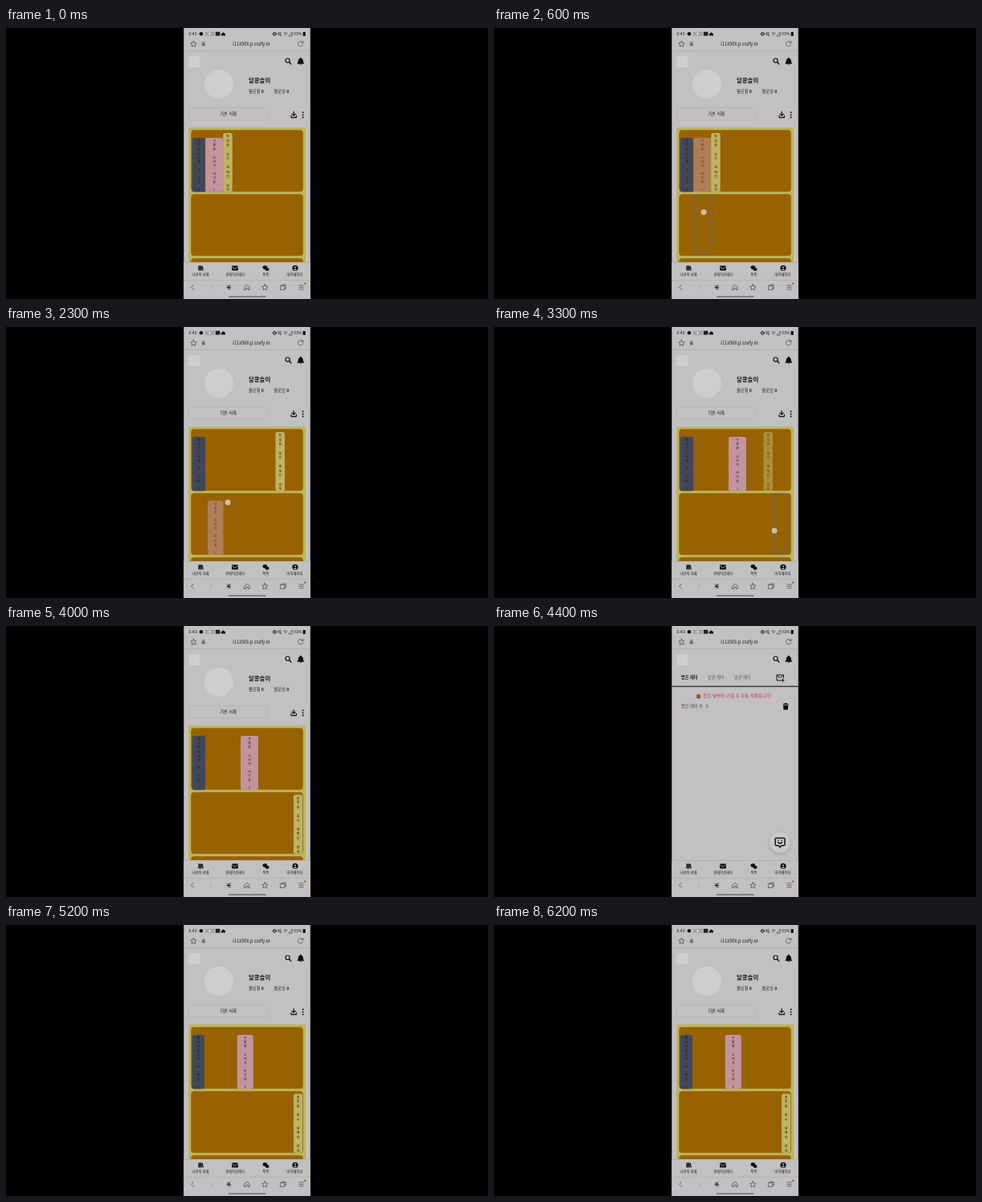
An HTML page that plays this animation: 600x338 px, repeating every 6.3 s.

```html
<!DOCTYPE html>
<html lang="ko">
<head>
<meta charset="utf-8">
<style>
  html, body { margin: 0; width: 100%; height: 100%; overflow: hidden; background: #000; }
  svg { display: block; width: 600px; height: 338px; }
  text { font: 5.2px "Noto Sans CJK KR", "Noto Sans CJK", "Noto Sans", sans-serif; fill: #1c1a1c; }
  .mid { text-anchor: middle; }
  .bold { font-weight: bold; }
  .tab { fill: #555; }
  .nav { font-size: 4.3px; }
  .line { fill: none; stroke: #161416; stroke-width: 1; stroke-linecap: round; stroke-linejoin: round; }
  .thin { stroke: #444; stroke-width: .7; }
  .ink { fill: #0c0b0c; }
  .paper { fill: #c2c0c2; }
  .mark { fill: #d0cdd0; }
  .rule { fill: #a9a7a9; }
  .spine { font-size: 3.9px; text-anchor: middle; }
  .shelf { fill: #986200; }
</style>
</head>
<body>
<svg viewBox="0 0 600 338">
  <defs>
    <clipPath id="view"><rect x="221" y="30" width="158" height="262"/></clipPath>
    <filter id="blur" x="-50%" y="-50%" width="200%" height="200%"><feGaussianBlur stdDeviation="2"/></filter>
  </defs>
  <rect width="600" height="338"/>
  <rect class="paper" x="221.3" width="157.5" height="338"/>

  <g id="library" clip-path="url(#view)">
    <circle class="mark" cx="265" cy="70" r="18"/>
    <text x="302" y="68" style="font-size:7.4px" class="bold">달콩솔이</text>
    <text x="302" y="81">팔로워 <tspan class="bold">0</tspan></text>
    <text x="333.5" y="81">팔로잉 <tspan class="bold">0</tspan></text>
    <rect x="227" y="99.5" width="98.5" height="15.5" rx="2" fill="none" stroke="#b0aeb0" stroke-width=".7"/>
    <text x="276.5" y="109.3" class="mid">기본 서재</text>
    <path class="line" style="stroke-width:1.2" d="M358.2 104.3v5m-2.2-2.2 2.2 2.2 2.2-2.2M355 109.3v2.3h6.4v-2.3"/>
    <g class="ink"><circle cx="369.6" cy="105.3" r=".95"/><circle cx="369.6" cy="108.4" r=".95"/><circle cx="369.6" cy="111.5" r=".95"/></g>
    <rect x="227" y="124" width="146" height="190" rx="3" fill="#beb55c"/>
    <rect class="shelf" x="230.3" y="127.3" width="139.5" height="77" rx="4"/>
    <rect class="shelf" x="230.3" y="207.3" width="139.5" height="77" rx="4"/>
    <rect class="shelf" x="230.3" y="287.3" width="139.5" height="77" rx="4"/>
    <g id="books"></g>
    <rect id="slot" height="73" fill="none" stroke="#626468" stroke-width="1.4" stroke-dasharray="4 2" rx="2"/>
  </g>

  <g id="letters">
    <text x="233" y="66" class="bold">받은 레터</text>
    <text x="266" y="66" class="tab">보낸 레터</text>
    <text x="299" y="66" class="tab">보관 레터</text>
    <path class="line" d="M357 68h-5v-7h8.5v3.5M352 61.5l4.2 3 4.2-3M359.5 66v3.5M357.8 67.8h3.4"/>
    <rect x="221.3" y="74.7" width="157.5" height="1.4" fill="#343234"/>
    <circle cx="254.6" cy="87.3" r="2.5" fill="#a64c32"/>
    <path d="M252 89.6h5.2" stroke="#57462c"/>
    <text x="260.5" y="88.5" style="fill:#c02e52;font-size:5.4px">받은 날부터 15일 후 자동 삭제됩니다!</text>
    <text x="233" y="102.3" style="fill:#4c4024">받은 레터 수 : 0</text>
    <path class="ink" d="M359.6 97h2l.6-1h1.8l.6 1h2v1.1h-7zM360 98.8h6.2l-.4 5.6h-5.4z"/>
    <circle cx="356" cy="271.5" r="13" fill="#888" opacity=".6" filter="url(#blur)"/>
    <circle cx="356" cy="270" r="13" fill="#cac8ca"/>
    <path class="line" style="stroke-width:1.5" d="M351.3 264.5h9.5q1.2 0 1.2 1.2v6.8q0 1.2-1.2 1.2h-2.6l-2.2 2.2-2.2-2.2h-2.5q-1.2 0-1.2-1.2v-6.8q0-1.2 1.2-1.2zM353.5 269.8q2.5 2.8 5 0M353.8 267.4h.1M358.2 267.4h.1"/>
  </g>

  <g id="loader"></g>

  <!-- status and address bars -->
  <g>
    <text x="227.5" y="9.2">6:43</text>
    <circle cx="243" cy="7.3" r="2.3" class="ink"/>
    <path class="line thin" d="M248 5l1.4 1.6m0 1.4-1.4 1.6M252 5l-1.4 1.6m0 1.4 1.4 1.6M255 5l1.4 1.6m0 1.4-1.4 1.6M259 5l-1.4 1.6m0 1.4 1.4 1.6"/>
    <rect x="260.8" y="4.8" width="5.6" height="5" rx=".8" fill="#222"/>
    <path class="ink" d="M268 9.5q-1.3-2.2 1-2.6.8-2.4 2.6-.6 2 .6 1.3 3.2z"/>
    <circle class="line" cx="334.3" cy="7.4" r="1.9"/>
    <path class="line thin" d="M334.3 6.2v1.4h1M338.8 6.5h1.2l1.8-1.6v5l-1.8-1.6h-1.2zM338.6 5l4 4.6M345.5 6.4q2.3-2 4.6 0M346.5 7.8q1.3-1 2.6 0M347.8 9.2h.1M352 9.8l4.4-4.8v4.8z"/>
    <text x="358.3" y="9.2" style="font-size:5px">93%</text>
    <rect x="369.7" y="5" width="3" height="5" rx=".6" class="ink"/>
    <path class="line thin" d="M233.5 16.2l1.1 2.4 2.6.3-1.9 1.8.5 2.6-2.3-1.3-2.3 1.3.5-2.6-1.9-1.8 2.6-.3z"/>
    <rect x="244" y="19.3" width="3.6" height="3" fill="#666"/>
    <path class="line thin" d="M244.8 19v-1q1-1.4 2 0v1M369.4 18a3.2 3.2 0 1 0 .4 2.5M369.8 16.4v2h-2"/>
    <text x="305.5" y="22" class="mid" style="font-size:5.6px">i11a506.p.ssafy.io</text>
    <rect class="rule" x="221.3" y="28" width="157.5" height=".6"/>
    <rect class="mark" x="227.5" y="35" width="14" height="14"/>
    <circle class="line" cx="350.6" cy="40.6" r="2.6" style="stroke-width:1.2"/>
    <path class="line" style="stroke-width:1.4" d="M352.6 42.6l2.2 2.3"/>
    <path class="ink" d="M366.8 36.8q.9 0 .9 1 2.2.7 2.2 3.5 0 2 1.3 3.4h-8.8q1.3-1.4 1.3-3.4 0-2.8 2.2-3.5 0-1 .9-1zM365.7 45.2h2.2q-1.1 1.7-2.2 0z"/>
  </g>

  <!-- app navigation and browser bar -->
  <g>
    <rect class="paper" x="221.3" y="292" width="157.5" height="46"/>
    <rect class="rule" x="221.3" y="292" width="157.5" height=".6"/>
    <rect class="rule" x="221.3" y="314.3" width="157.5" height=".5"/>
    <path class="ink" d="M239.5 296.4h2v6.2h-2zM241.9 296.4h1.6v6.2h-1.6zM243.6 297l1.2-.3 1 5.6-1.3.3z"/>
    <rect x="281" y="296.4" width="8" height="6.2" rx="1" class="ink"/>
    <path d="M281 297.7l4 2.8 4-2.8" fill="none" stroke="#c2c0c2" stroke-width=".8"/>
    <ellipse cx="322.4" cy="298.6" rx="2.8" ry="2.3" class="ink"/>
    <ellipse cx="325.1" cy="301" rx="2.5" ry="1.9" class="ink"/>
    <circle cx="360" cy="299.5" r="3.6" class="ink"/>
    <g class="paper"><circle cx="360" cy="298.5" r="1.1"/><path d="M357.9 301.6q2.1-2.4 4.2 0-2.1 1.6-4.2 0z"/></g>
    <g class="mid">
      <text class="nav" x="242" y="309.2">나만의 서재</text>
      <text class="nav" x="285" y="309.2">큐레이션레터</text>
      <text class="nav" x="323.5" y="309.2">톡톡</text>
      <text class="nav" x="359.5" y="309.2">마이페이지</text>
    </g>
    <path class="line thin" d="M233.5 320.3l-2.8 3 2.8 3"/>
    <path class="line thin" style="stroke:#999" d="M254 320.3l2.8 3-2.8 3"/>
    <path class="line thin" style="stroke:#161416" d="M275 321l4.5 5M279.5 320.5l-4.3 4.8M275 323.5h5M277.5 321v5"/>
    <path class="line thin" d="M296.8 323l3.2-2.7 3.2 2.7v3.6h-2v-2.2h-2.4v2.2h-2zM322.3 319.7l1.1 2.4 2.6.3-1.9 1.8.5 2.6-2.3-1.3-2.3 1.3.5-2.6-1.9-1.8 2.6-.3zM341.8 321.6h5v4.8h-5zM343.3 321.4v-1.2h5v4.6h-1.3"/>
    <path class="line thin" d="M365 321h5.2M365 323.4h5.2M365 325.8h5.2"/>
    <circle cx="372.3" cy="318.8" r="1.2" fill="#9a6a20"/>
    <rect x="277" y="334.4" width="46.5" height="1.3" rx=".6" fill="#5b595b"/>
  </g>
  <circle id="touch" r="3.5" fill="#dcd9da" opacity=".78"/>
</svg>
<script>
const LOOP = 6300;
const byId = id => document.getElementById(id);

function add(parent, tag, attrs, label = '') {
  const node = document.createElementNS('http://www.w3.org/2000/svg', tag);
  set(node, attrs);
  node.textContent = label;
  return parent.appendChild(node);
}
function set(node, attrs) {
  for (const key in attrs) node.setAttribute(key, attrs[key]);
}
const show = (node, on) => { node.style.display = on ? '' : 'none'; };

// stops: [time, x, top, width]
const books = [
  { title: '별나라도서관 속 비밀 1', color: '#414857', height: 67.5,
    stops: [[0, 231.7, 137, 16.5], [5100, 231.7, 137, 15.2]] },
  { title: '구름꽃 소년과 바다숲 1', color: '#c2949e', height: 67.5,
    stops: [[0, 248.2, 137, 22], [800, 251, 216.5, 19.5], [2800, 292, 137, 22], [5100, 287.8, 137, 20]] },
  { title: '달빛을 찾아 헤매던 날에', color: '#beb461', height: 73.5,
    stops: [[0, 270.2, 131, 11.5], [800, 269.3, 131, 11.5], [1900, 335.5, 131, 11.5], [3600, 358, 210.5, 11]] }
];
for (const book of books) {
  book.node = add(byId('books'), 'g', {});
  book.rect = add(book.node, 'rect', { height: book.height, rx: 2.5, fill: book.color });
  const step = (book.height - 5) / 12.3;
  book.letters = [...book.title].map((char, i) =>
    add(book.node, 'text', { class: 'spine', y: 5.3 + i * step }, char));
}

// path: [time, x, y]; grab: distance from the slot's left edge to the finger
const drags = [
  { book: 1, grab: 12, width: 20, path: [[200, 259, 172], [350, 259, 178], [700, 262, 250], [800, 262, 250]] },
  { book: 2, grab: 12, width: 20, path: [[1100, 275, 168], [1250, 279, 172], [1400, 294, 179], [1750, 341, 176], [1900, 344, 175]] },
  { book: 1, grab: 12, width: 20, path: [[2150, 262, 245], [2200, 264, 240], [2300, 276, 219], [2650, 302, 174], [2800, 303, 172]] },
  { book: 2, grab: 0, width: 18, path: [[3000, 341, 170], [3100, 342, 180], [3300, 349, 254], [3450, 361, 252], [3600, 362, 250]] },
  { path: [[4150, 285, 300], [4300, 285, 300]] },
  { path: [[4680, 242, 300], [4800, 242, 300]] }
];

function along(path, t) {
  const i = Math.max(1, path.findIndex(p => p[0] > t));
  const [a, b] = [path[i - 1], path[i]];
  const k = (t - a[0]) / (b[0] - a[0]);
  return [1, 2].map(n => a[n] + (b[n] - a[n]) * k);
}

const dots = ['#55725e', '#b8485a', '#77685a'].map((fill, i) =>
  add(byId('loader'), 'circle', { cx: 294 + i * 6.2, r: 2.3, fill }));

function draw(t) {
  const page = t < 4300 || t >= 5100 ? 'library' : t < 4800 ? 'letters' : 'loader';
  for (const id of ['library', 'letters', 'loader']) show(byId(id), id === page);

  const drag = drags.find(({ path }) => t >= path[0][0] && t < path.at(-1)[0]);
  books.forEach((book, i) => {
    const [, x, y, width] = book.stops.findLast(stop => stop[0] <= t);
    set(book.node, { transform: `translate(${x} ${y})`, opacity: drag?.book === i ? .55 : 1 });
    set(book.rect, { width });
    for (const letter of book.letters) set(letter, { x: width / 2 });
  });

  show(byId('touch'), drag);
  show(byId('slot'), drag?.book && t > drag.path[0][0] + 180);
  if (drag) {
    const [x, y] = along(drag.path, t);
    set(byId('touch'), { cx: x, cy: y });
    if (drag.book) {
      const left = Math.min(x - drag.grab, 367 - drag.width);
      set(byId('slot'), { x: left, y: y < 206 ? 129.3 : 209.3, width: drag.width });
    }
  }
  dots.forEach((dot, i) => set(dot, { cy: 171.2 + .8 * Math.sin((t - 4970) / 130 + i * 1.5) }));
}

function frame(now) {
  draw(now % LOOP);
  requestAnimationFrame(frame);
}
draw(0);
requestAnimationFrame(frame);
</script>
</body>
</html>
```
